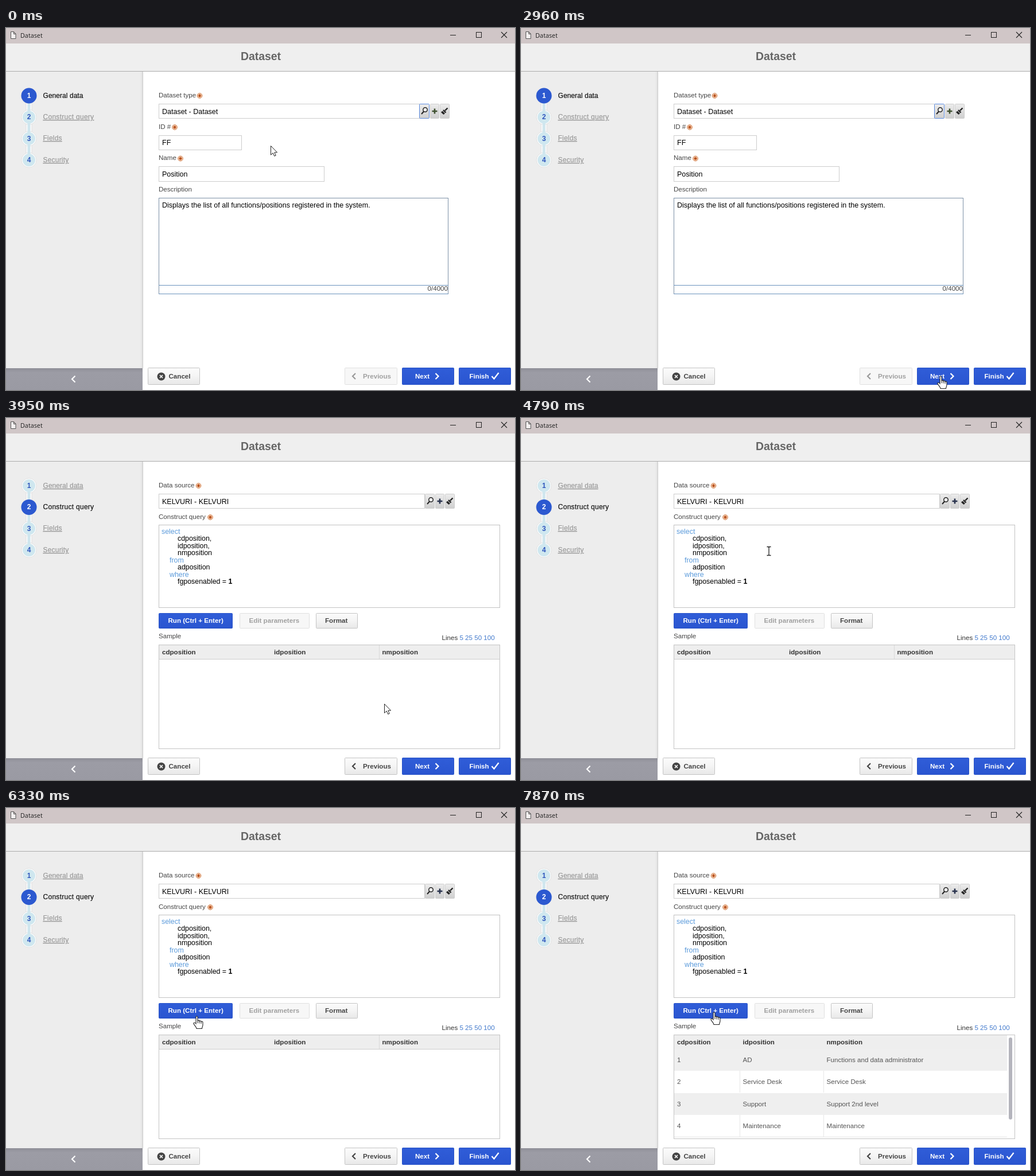
An HTML page that plays this animation: 887 by 631 pixels, repeating every 8 s.

```html
<!DOCTYPE html>
<html lang="en">
<head>
<meta charset="utf-8">
<title>Dataset</title>
<style>
  html, body { margin: 0; width: 100%; height: 100%; overflow: hidden; background: #fff; }
  svg { display: block; width: 100%; height: 100%; }
  text { font-family: "Liberation Sans", Arial, sans-serif; white-space: pre; }
</style>
</head>
<body>
<svg id="stage" viewBox="0 0 887 631" xmlns="http://www.w3.org/2000/svg">
  <defs>
    <linearGradient id="grey" x2="0" y2="1">
      <stop offset="0" stop-color="#fbfbfb"/><stop offset=".5" stop-color="#f4f4f4"/><stop offset="1" stop-color="#e8e8e8"/>
    </linearGradient>
    <linearGradient id="tool" x2="0" y2="1">
      <stop offset="0" stop-color="#ececec"/><stop offset="1" stop-color="#cfcfcf"/>
    </linearGradient>
    <linearGradient id="blue" x2="0" y2="1">
      <stop offset="0" stop-color="#305dd8"/><stop offset="1" stop-color="#2a55d0"/>
    </linearGradient>
    <linearGradient id="edge">
      <stop offset="0" stop-color="#ededed"/><stop offset="1" stop-color="#dedede"/>
    </linearGradient>
    <linearGradient id="bar" x2="0" y2="1">
      <stop offset="0" stop-color="#8f8f98"/><stop offset=".2" stop-color="#9c9ca5"/><stop offset="1" stop-color="#9a9aa3"/>
    </linearGradient>
  </defs>
  <g id="frame"></g>
  <g id="general"></g>
  <g id="query"></g>
  <g id="empty"></g>
  <g id="results"></g>
  <g id="cursor"></g>
</svg>
<script>
const $ = id => document.getElementById(id);
const LOOP = 8000, STEP = 140, QUERY_AT = 3100, RESULTS_AT = 6750;

const rect = (x, y, w, h, fill, extra = '') =>
  `<rect x="${x}" y="${y}" width="${w}" height="${h}" fill="${fill}" ${extra}/>`;
const box = (x, y, w, h, stroke = '#cdcdcd', fill = '#fff', r = 0) =>
  rect(x + .5, y + .5, w - 1, h - 1, fill, `stroke="${stroke}" rx="${r}"`);
const path = (d, stroke, width = 1, fill = 'none') =>
  `<path d="${d}" stroke="${stroke}" stroke-width="${width}" fill="${fill}"/>`;
const text = (x, y, s, size = 11.6, fill = '#444', extra = '') =>
  `<text x="${x}" y="${y}" font-size="${size}" fill="${fill}" ${extra}>${s}</text>`;
const bold = (x, y, s, fill = '#333') => text(x, y, s, 11.6, fill, 'font-weight="700"');
const value = (x, y, s) => text(x, y, s, 12.5, '#000');

const required = (x, y) =>
  `<circle cx="${x}" cy="${y}" r="4.3" fill="#fbe3cf" stroke="#cf7238"/>` +
  path(`M${x - 3} ${y}h6M${x} ${y - 3}v6M${x - 2} ${y - 2}l4 4m0-4l-4 4`, '#b9501a', 1.1);

function button(x, y, w, h, label, tx, kind = 'grey') {
  const [fill, stroke, ink] = {
    grey: ['url(#grey)', '#c4c4c4', '#444'],
    blue: ['url(#blue)', '#2a54c8', '#fff'],
    off: ['#f7f7f7', '#e0e0e0', '#a0a0a0']
  }[kind];
  return box(x, y, w, h, stroke, fill, 1) + bold(tx, Math.floor(y + h / 2) + 4, label, ink);
}

const chevron = (x, y, dir, color, size = 5) =>
  path(`M${x} ${y - size}l${dir * size} ${size}l${-dir * size} ${size}`, color, 2.2);

// search, add and clear buttons beside a lookup field
function lookup(x, widths, focus, plus) {
  const [a, b, c] = widths;
  const tool = (left, w, stroke = '#cdcdcd') => box(left, 132, w, 26, stroke, 'url(#tool)', 1);
  const brush = x + a + b + 2;
  return tool(x, a, focus ? '#5b8be0' : undefined) + tool(x + a + 1, b) + tool(brush, c) +
    `<circle cx="${x + 10.5}" cy="142.5" r="3.7" fill="#f4f4f4" stroke="#222" stroke-width="1.5"/>` +
    path(`M${x + 8} 145.5l-4 4.5`, '#222', 2) +
    path(`M${x + a + 4.5} 145h9m-4.5-4.5v9`, plus, 2.6) +
    path(`M${brush + 13.5} 139.5l-4.5 4.5`, '#222', 2.4) +
    path(`M${brush + 6} 143l4.5 4.5`, '#222', 2.4) +
    path(`M${brush + 4.5} 145l4 4l-2 1.5l-4-3.5z`, '#222', 1, '#222');
}

function steps(active) {
  const names = ['General data', 'Construct query', 'Fields', 'Security'];
  const gaps = [.05, .28, .2, .2];
  let s = rect(35, 118, 10, 112, '#fbfbfb', 'stroke="#dcdcdc" stroke-width=".8"');
  let discs = '';
  names.forEach((name, i) => {
    const y = 118 + i * 37.4, on = i === active, ink = on ? '#111' : '#999';
    s += `<circle cx="40" cy="${y}" r="13" fill="#fbfbfb" stroke="#dcdcdc" stroke-width=".8"/>`;
    discs += `<circle cx="40" cy="${y}" r="${on ? 13.5 : 11}" fill="${on ? '#2c59d0' : '#cfe7ef'}"/>` +
      text(40, Math.round(y + 4), i + 1, 12, on ? '#fff' : '#2f56bd', 'font-weight="700" text-anchor="middle"') +
      text(64.5, Math.round(y + 3.6), name, 12, ink, `letter-spacing="${gaps[i]}" stroke="${ink}" stroke-width=".2"` +
        (on ? '' : ' text-decoration="underline"'));
  });
  return s + rect(37.5, 118, 5, 112, '#cfe6ee') + discs;
}

$('frame').innerHTML =
  rect(0, 0, 887, 631, '#fff') +
  rect(0, 0, 887, 27, '#d0c6c7') +
  path('M8.5 6.5h5l3.5 3.5v8.5h-8.5zM13.5 6.5v4h3.5', '#555', 1, '#f3efef') +
  text(25, 16.5, 'Dataset', 10.8, '#222', 'style="font-family:\'Open Sans\',sans-serif"') +
  path('M774 12.5h10', '#222') + box(819, 7, 10, 10, '#222', 'none') +
  path('M863 7l10 10m0-10l-10 10', '#222', 1.1) +
  rect(0, 27, 887, 49, '#efefef') +
  text(444, 56, 'Dataset', 19.4, '#666', 'font-weight="700" text-anchor="middle"') +
  rect(0, 76, 238, 517, '#ededed') + rect(234, 76, 4, 517, 'url(#edge)') +
  rect(238, 76, 1, 517, '#cccccc') + rect(0, 75, 887, 1, '#acacac') +
  rect(0, 593, 238, 38, 'url(#bar)') + chevron(120.5, 612, -1, '#fff', 5.5) +
  button(247, 592, 91, 30, 'Cancel', 283.5) +
  '<circle cx="270.5" cy="607.5" r="7" fill="#444"/>' + path('M268 605l5 5m0-5l-5 5', '#fff', 1.7) +
  button(690, 592, 91, 30, 'Next', 713, 'blue') + chevron(748.5, 607, 1, '#fff') +
  button(789, 592, 91, 30, 'Finish', 807.5, 'blue') + path('M846.5 607l4 4.5l8-10.5', '#fff', 2.3);

$('general').innerHTML = steps(0) +
  text(266, 121, 'Dataset type') + required(337.5, 118) +
  box(266, 132, 455, 26) + value(272, 150, 'Dataset - Dataset') + lookup(720, [18, 16, 17], true, '#3f5130') +
  text(266, 176, 'ID #') + required(294, 173) + box(266, 187, 145, 26) + value(272, 204, 'FF') +
  text(266, 230, 'Name') + required(304, 227.5) + box(266, 241, 289, 27) + value(272, 259, 'Position') +
  text(266, 285, 'Description') + box(266, 296, 505, 168, '#7c90a6') + path('M266 448.5h505m0 15h-505', '#6b93bd') +
  value(272, 313, 'Displays the list of all functions/positions registered in the system.') +
  text(770, 458, '0/4000', 11.6, '#444', 'text-anchor="end"') +
  button(590, 592, 92, 30, 'Previous', 622, 'off') + chevron(609, 607, -1, '#999');

const code = [[271, 'select', 1], [299, 'cdposition,'], [299, 'idposition,'], [299, 'nmposition'],
  [285, 'from', 1], [299, 'adposition'], [285, 'where', 1], [299, 'fgposenabled = <tspan font-weight="700">1</tspan>']];

$('query').innerHTML = steps(1) +
  text(266, 121, 'Data source') + required(335.5, 118) +
  box(266, 132, 464, 26) + value(272, 150, 'KELVURI - KELVURI') + lookup(730, [17, 16, 17], false, '#28324d') +
  text(266, 176, 'Construct query') + required(356, 173) + box(266, 186, 595, 145, '#c2c2c2') +
  code.map(([x, s, key], i) => text(x, Math.round(201.8 + i * 12.45), s, 12.4, key ? '#5c9bdb' : '#000')).join('') +
  button(266, 340, 129, 27, 'Run (Ctrl + Enter)', 282.5, 'blue') +
  button(407, 340, 122, 27, 'Edit parameters', 423.5, 'off') +
  button(540, 340, 73, 27, 'Format', 556) +
  text(266, 384, 'Sample') +
  text(759.5, 387, 'Lines <tspan fill="#4179cc">5 25 50 100</tspan>', 11.6, '#333') +
  button(590, 592, 92, 30, 'Previous', 622) + chevron(609, 607, -1, '#444');

const header = (w, cols) => box(266, 395, 595, 182, '#c4c4c4') +
  rect(267, 396, w, 24, '#eeeeee') + rect(267, 420, w, 1, '#cfcfcf') +
  ['cdposition', 'idposition', 'nmposition'].map((s, i) => bold(cols[i], 412, s)).join('');

$('empty').innerHTML = header(593, [272, 467, 655.5]) + rect(650, 396, 1, 24, '#dadada');

const rows = [['AD', 'Functions and data administrator'], ['Service Desk', 'Service Desk'],
  ['Support', 'Support 2nd level'], ['Maintenance', 'Maintenance']];

$('results').innerHTML = header(580, [272, 386.5, 532.5]) +
  rows.map(([id, name], i) => {
    const y = Math.round(420 + i * 38.4);
    return (i % 2 ? rect(381, y, 1, 38, '#e6e6e6') + rect(527, y, 1, 38, '#e6e6e6') : rect(267, y, 580, 38, '#efefef')) +
      [i + 1, id, name].map((s, c) => text([272, 386.5, 532.5][c], y + 23, s, 11.6, '#555')).join('');
  }).join('') + rect(267, 573, 580, 1, '#e6e6e6') +
  rect(850, 400, 6, 143, '#b4b4bc', 'rx="3"');

const shapes = {
  arrow: path('M.5 .5V16.2L4.2 12.8L6.7 18.3L9.2 17.2L6.8 11.9H11.6Z', '#222', 1, '#fff'),
  beam: path('M-3.5-7.5h2.5l1 1l1-1h2.5M0-6.5V6.5M-3.5 7.5h2.5l1-1l1 1h2.5', '#222', 1.3),
  hand: path('M-2 1.5C-2-.5 1-.5 1 1.5V8C1.5 6.7 4 6.9 4 8.4C4.8 7.4 7 7.8 7 9.4C8 8.6 10 9 10 10.8V15C10 18 8.5 19 8.5 21.5H-1C-1 19-5 15.5-6 13C-6.6 11-4 10.5-2 13Z', '#222', 1.1, '#fff') +
    path('M1 8v4M4 8.5v4M7 9.5v3.5', '#222')
};

// pointer route: time, x, y, shape worn from that moment on
const route = [
  [0, 461, 205, 'arrow'], [430, 461, 205, 'arrow'], [710, 372, 275, 'arrow'], [850, 318, 322, 'beam'],
  [990, 301, 318, 'beam'], [1130, 304, 277, 'arrow'], [1700, 304, 277, 'arrow'], [1840, 334, 331, 'beam'],
  [1980, 350, 350, 'beam'], [2260, 500, 460, 'arrow'], [2540, 680, 570, 'arrow'], [2680, 724, 600, 'hand'],
  [2820, 731, 604, 'hand'], [2960, 732, 607, 'hand'], [3810, 732, 607, 'hand'], [3950, 659, 498, 'arrow'],
  [4230, 480, 300, 'beam'], [4510, 352, 203, 'beam'], [4790, 432, 232, 'beam'], [4930, 443, 237, 'beam'],
  [5070, 430, 250, 'beam'], [5350, 350, 302, 'arrow'], [5490, 339, 310, 'arrow'], [5770, 339, 310, 'arrow'],
  [6050, 334, 345, 'hand'], [6330, 333, 363, 'hand'], [6470, 337, 356, 'hand'], [LOOP, 337, 356, 'hand']
];

// the pointer ticks every 140 ms, re-aligned at each start
const tick = t => {
  const start = [3950, 1840, 570].find(s => t >= s);
  return start === undefined ? 0 : start + Math.floor((t - start) / STEP) * STEP;
};

const show = (id, on) => $(id).setAttribute('display', on ? 'inline' : 'none');

let worn = '';
function draw(t) {
  show('general', t < QUERY_AT);
  show('query', t >= QUERY_AT);
  show('empty', t >= QUERY_AT && t < RESULTS_AT);
  show('results', t >= RESULTS_AT);
  const now = tick(t);
  const i = route.findIndex((k, n) => now >= k[0] && now < route[n + 1][0]);
  const [t0, x0, y0, shape] = route[i], [t1, x1, y1] = route[i + 1];
  const p = (now - t0) / (t1 - t0);
  if (shape !== worn) $('cursor').innerHTML = shapes[worn = shape];
  $('cursor').setAttribute('transform', `translate(${Math.round(x0 + (x1 - x0) * p)} ${Math.round(y0 + (y1 - y0) * p)})`);
}

const begin = performance.now();
function loop() {
  draw((performance.now() - begin) % LOOP);
  requestAnimationFrame(loop);
}
loop();
</script>
</body>
</html>
```
